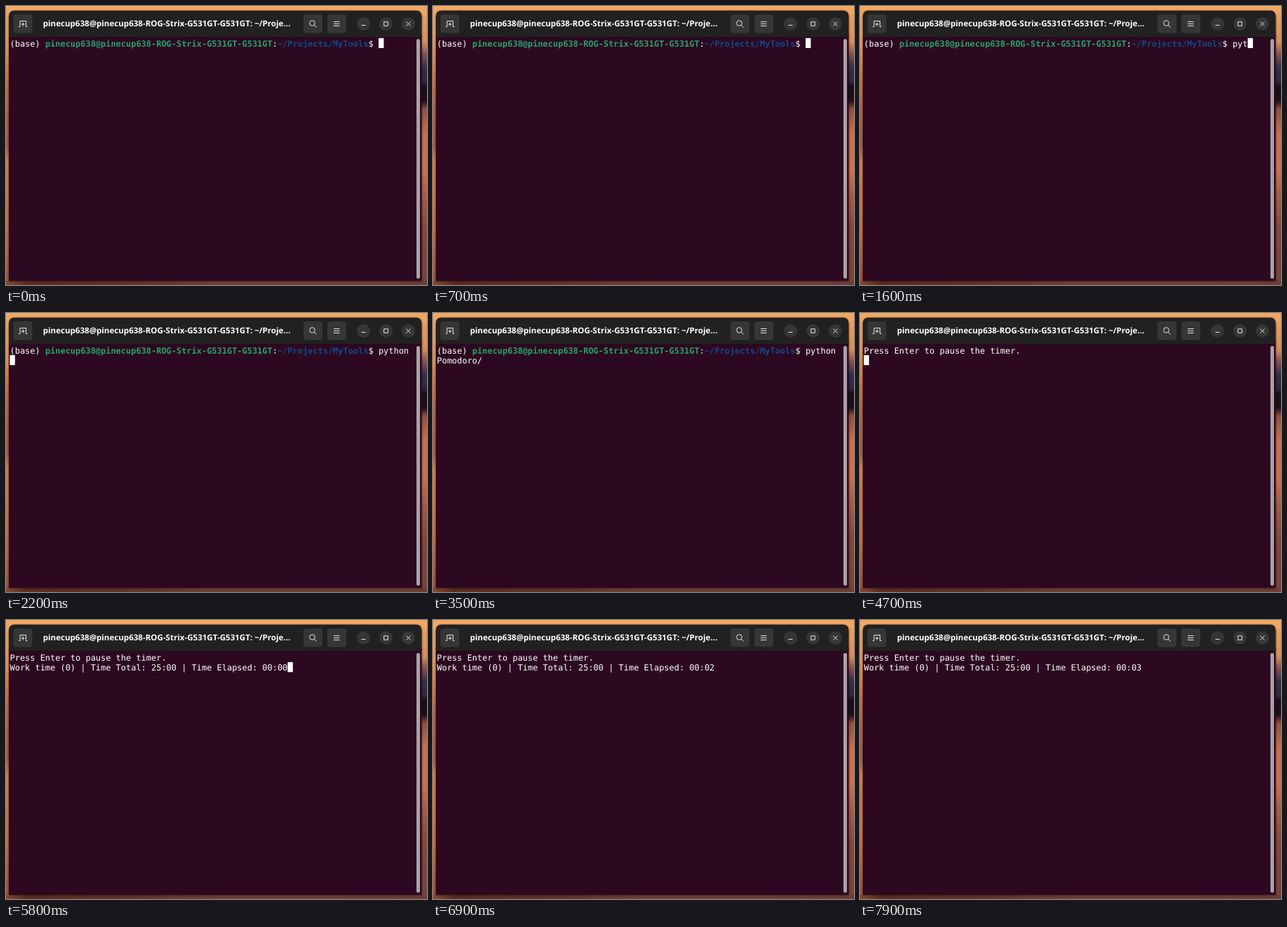
Animation, 600 px wide and 398 px high, one loop 8 s. Source, as an HTML page:

```html
<!DOCTYPE html>
<html lang="en">
<head>
<meta charset="utf-8">
<title>Terminal timer</title>
<style>
  html, body { margin: 0; width: 100%; height: 100%; overflow: hidden; }
  svg { display: block; width: 600px; height: 398px; }
  text { text-rendering: geometricPrecision; white-space: pre; fill: #fff; }
  .term { font: 11.96px "DejaVu Sans Mono", monospace; }
  .title { font: bold 11.57px "Open Sans", "Noto Sans", sans-serif; text-anchor: middle; }
  .host { font-weight: bold; fill: #26a269; }
  .path { font-weight: bold; fill: #12488b; }
  .window { filter: drop-shadow(0 1px 1.5px rgba(0, 0, 0, .5)); }
  .button { fill: #363636; }
  .icon { fill: none; stroke: #e8e8e8; }
</style>
</head>
<body>
<svg viewBox="0 0 600 398">
  <defs>
    <linearGradient id="left" x2="0" y2="1">
      <stop offset="0" stop-color="#f2a862"/>
      <stop offset=".16" stop-color="#e8944f"/>
      <stop offset=".26" stop-color="#d0743c"/>
      <stop offset=".35" stop-color="#b96440"/>
      <stop offset=".5" stop-color="#a85a40"/>
      <stop offset=".56" stop-color="#d67f48"/>
      <stop offset=".8" stop-color="#c8703f"/>
      <stop offset="1" stop-color="#9a5238"/>
    </linearGradient>
    <linearGradient id="right" x2="0" y2="1">
      <stop offset="0" stop-color="#f0a661"/>
      <stop offset=".13" stop-color="#d98d58"/>
      <stop offset=".17" stop-color="#8a5550"/>
      <stop offset=".22" stop-color="#34304a"/>
      <stop offset=".27" stop-color="#30273f"/>
      <stop offset=".29" stop-color="#1a0d18"/>
      <stop offset=".34" stop-color="#1e1018"/>
      <stop offset=".37" stop-color="#93503f"/>
      <stop offset=".46" stop-color="#c87050"/>
      <stop offset=".58" stop-color="#cc7450"/>
      <stop offset=".68" stop-color="#a85c46"/>
      <stop offset=".8" stop-color="#84483a"/>
      <stop offset="1" stop-color="#77433c"/>
    </linearGradient>
    <linearGradient id="bottom">
      <stop offset="0" stop-color="#8a4a30"/>
      <stop offset=".05" stop-color="#5c2c1e"/>
      <stop offset=".25" stop-color="#623227"/>
      <stop offset=".5" stop-color="#704036"/>
      <stop offset="1" stop-color="#703e38"/>
    </linearGradient>
  </defs>

  <path fill="url(#left)" d="M0 0H300V398H0z"/>
  <path fill="url(#right)" d="M300 0H600V398H300z"/>
  <path fill="#f1a762" d="M0 0H600V12H0z"/>
  <path fill="url(#bottom)" d="M0 392H600V398H0z"/>

  <g class="window">
    <path fill="#2c0920" d="M4 40H592.500V392H4z"/>
    <path fill="#212121" d="M4 44V15Q4 6.500 12 6.500H584.500Q592.500 6.500 592.500 15V44z"/>
  </g>
  <rect x="585" y="47" width="5" height="342" rx="2.500" fill="#aaa2a6"/>

  <g class="button">
    <rect x="10.500" y="12" width="27" height="26.500" rx="4"/>
    <rect x="424" y="12" width="27" height="26.500" rx="4"/>
    <rect x="458" y="12" width="27" height="26.500" rx="4"/>
    <circle cx="509.500" cy="25.500" r="9.500"/>
    <circle cx="541.500" cy="25.500" r="9.500"/>
    <circle cx="573.500" cy="25.500" r="9.500"/>
  </g>
  <g class="icon">
    <path d="M18 29.500H20V21.500H28.500V29.500H30.500M24.250 23.500V28.500M21.750 26H26.750"/>
    <circle cx="436.500" cy="24.500" r="3.800"/>
    <path d="M439.300 27.300L442.500 30.500"/>
    <path d="M467 22.500H475.500M467 25.500H475.500M467 28.500H475.500"/>
    <path d="M506.500 27.500H512.500"/>
    <path d="M538.700 22.700H544.300V28.300H538.700z"/>
    <path d="M570.500 22.500L576.500 28.500M576.500 22.500L570.500 28.500"/>
  </g>
  <text class="title" x="229" y="29.300">pinecup638@pinecup638-ROG-Strix-G531GT-G531GT: ~/Proje…</text>

  <rect id="cursor" width="7.400" height="14.200" fill="#fff"/>
  <g class="term">
    <text id="prompt" x="5.500" y="58">(base) <tspan class="host">pinecup638@pinecup638-ROG-Strix-G531GT-G531GT</tspan>:<tspan class="path">~/Projects/MyTools</tspan>$ <tspan id="command"></tspan></text>
    <text id="message" x="5.500" y="58">Press Enter to pause the timer.</text>
    <text id="second" x="5.500" y="72.300"></text>
  </g>
</svg>
<script>
const LOOP = 8000, BLINK = 600, CELL = 7.2, LINE = 14.3;
const PROMPT_COLS = 73, WRAP = 7;
const COMMAND = "python Pomodoro/pomodoro.py ";
const ENTER = 4600, CLEAR = 4700, TIMER = 4900;

// [time, characters typed so far]
const KEYS = [
  [-500, 0], [1400, 1], [1500, 2], [1600, 3], [1800, 4], [1900, 5], [2000, 6], [2200, 7],
  [2400, 8], [2700, 10], [2900, 16], [3600, 17], [3800, 18], [3900, 19], [4100, 28]
];

const el = id => document.getElementById(id);
const [cursor, prompt, command, message, second] =
  ["cursor", "prompt", "command", "message", "second"].map(el);
const show = (node, on) => node.setAttribute("visibility", on ? "visible" : "hidden");

function setText(node, value) {
  if (node.textContent !== value) node.textContent = value;
}

function timerLine(t) {
  if (t < TIMER) return "";
  const seconds = Math.floor((t - TIMER) / 1000);
  return "Work time (0) | Time Total: 25:00 | Time Elapsed: 00:" + String(seconds).padStart(2, "0");
}

function render(t) {
  const running = t >= CLEAR;
  const [keyTime, count] = KEYS.findLast(([time]) => time <= t);
  const typed = COMMAND.slice(0, count);
  const wrapped = running || count >= WRAP;
  const line = running ? timerLine(t) : typed.slice(WRAP);
  const column = wrapped ? line.length : PROMPT_COLS + count;
  const blinkStart = t >= ENTER ? ENTER : keyTime;

  show(prompt, !running);
  show(message, running);
  setText(command, typed.slice(0, WRAP));
  setText(second, line);
  cursor.setAttribute("x", 5.4 + column * CELL);
  cursor.setAttribute("y", 45.8 + (wrapped ? LINE : 0));
  show(cursor, Math.floor((t - blinkStart) / BLINK) % 2 === 0);
}

const start = performance.now();
function tick() {
  render((performance.now() - start) % LOOP);
  requestAnimationFrame(tick);
}
tick();
</script>
</body>
</html>
```
